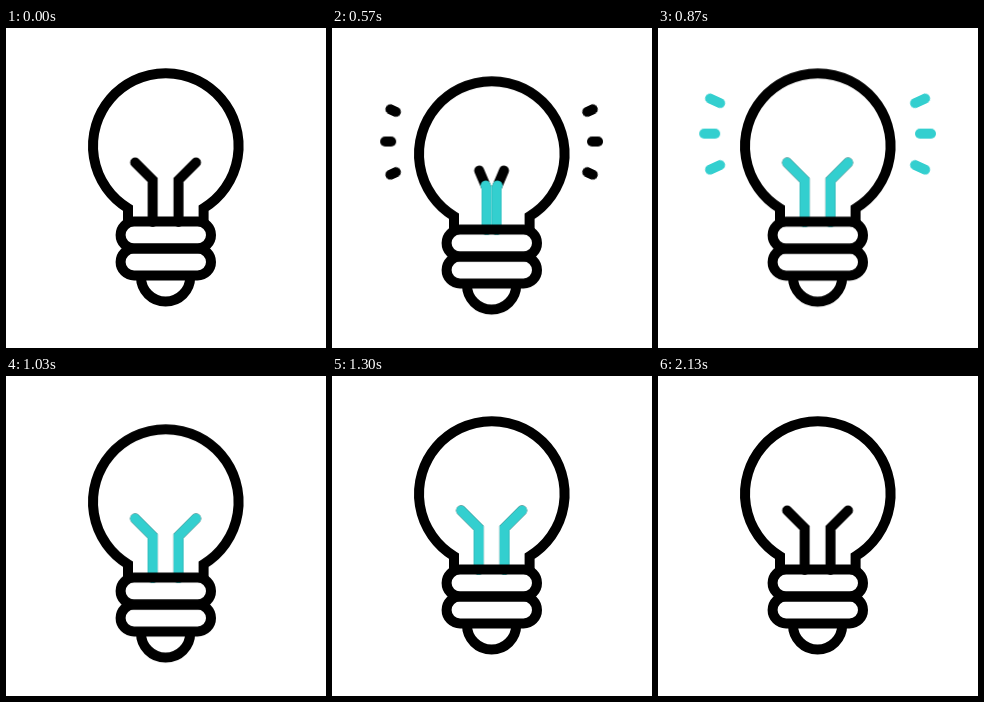
These frames come from a looping animation (320x320 px, 2.5 s). An HTML page:

```html
<!DOCTYPE html>
<html lang="en">
<head>
<meta charset="utf-8">
<title>Light bulb</title>
<style>
  html, body { margin: 0; width: 100%; height: 100%; overflow: hidden; background: #fff; }
  svg { display: block; width: 100vw; height: 100vh; }
  path, rect { fill: none; stroke: #000; stroke-width: 10; }
  .bulb, .wire, .glow, .ray { animation: 2500ms linear infinite; }

  .bulb { animation-name: bounce; }
  @keyframes bounce {
    0% { transform: translateY(0); }
    12% { transform: translateY(0); animation-timing-function: cubic-bezier(.4, 0, .8, .8); }
    26.4% { transform: translateY(12px); animation-timing-function: cubic-bezier(.33, 0, .67, 1); }
    33.2% { transform: translateY(0); }
    34% { transform: translateY(0); animation-timing-function: cubic-bezier(.4, 0, .8, .8); }
    43.6% { transform: translateY(12px); animation-timing-function: cubic-bezier(.33, 0, .67, 1); }
    52%, 100% { transform: translateY(0); }
  }

  .wire { stroke-linecap: round; animation-name: squeeze; }
  @keyframes squeeze {
    0% { d: path("M12.9 194V152L30.4 134.5"); }
    12% { d: path("M12.9 194V152L30.4 134.5"); animation-timing-function: cubic-bezier(.4, 0, .8, .8); }
    26.4% { d: path("M1 194V152L3.5 134.5"); animation-timing-function: cubic-bezier(.33, 0, .67, 1); }
    33.2%, 100% { d: path("M12.9 194V152L30.4 134.5"); }
  }

  .glow { stroke: #33cfcf; stroke-dasharray: 1 2; animation-name: squeeze, fill; }
  @keyframes fill {
    0% { stroke-dashoffset: 1; }
    12% { stroke-dashoffset: 1; animation-timing-function: cubic-bezier(.4, 0, .8, .8); }
    25.6% { stroke-dashoffset: 0; }
    69.6% { stroke-dashoffset: 0; animation-timing-function: cubic-bezier(.33, 0, .67, 1); }
    85.2%, 100% { stroke-dashoffset: 1; }
  }

  .ray { stroke-linecap: round; opacity: 0; animation-name: shoot; }
  @keyframes shoot {
    0%, 18.79% { opacity: 0; d: path("M-3 0H-2.9"); }
    18.8% { opacity: 1; d: path("M-3 0H-2.9"); }
    22.8% { opacity: 1; d: path("M-2 0H4"); }
    30%, 33% { opacity: 1; d: path("M0 0H11"); }
    33.01%, 100% { opacity: 0; d: path("M0 0H11"); }
  }
  .tint { stroke: #33cfcf; animation-name: tint; }
  @keyframes tint {
    0%, 23.99% { opacity: 0; d: path("M-2 0H-1.9"); }
    24% { opacity: 1; d: path("M-2 0H-1.9"); }
    32% { opacity: 1; d: path("M0 0H11"); }
    34.8% { opacity: 1; d: path("M0 0H11"); animation-timing-function: cubic-bezier(.33, 0, .67, 1); }
    40% { opacity: 1; d: path("M10.9 0H11"); }
    40.01%, 100% { opacity: 0; d: path("M10.9 0H11"); }
  }
</style>
</head>
<body>
<svg viewBox="0 0 320 320">
  <g class="bulb">
    <!-- right half -->
    <g transform="translate(159.6 0)">
      <path class="wire" d="M12.9 194V152L30.4 134.5"/>
      <path class="wire glow" pathLength="1" d="M12.9 194V152L30.4 134.5"/>
      <g transform="translate(97.5 75) rotate(-24.5)">
        <path class="ray" d="M0 0H11"/>
        <path class="ray tint" d="M0 0H11"/>
      </g>
      <g transform="translate(102.4 105.5)">
        <path class="ray" d="M0 0H11"/>
        <path class="ray tint" d="M0 0H11"/>
      </g>
      <g transform="translate(97.5 137) rotate(24.5)">
        <path class="ray" d="M0 0H11"/>
        <path class="ray tint" d="M0 0H11"/>
      </g>
    </g>
    <!-- left half, mirrored -->
    <g transform="translate(159.6 0) scale(-1 1)">
      <path class="wire" d="M12.9 194V152L30.4 134.5"/>
      <path class="wire glow" pathLength="1" d="M12.9 194V152L30.4 134.5"/>
      <g transform="translate(97.5 75) rotate(-24.5)">
        <path class="ray" d="M0 0H11"/>
        <path class="ray tint" d="M0 0H11"/>
      </g>
      <g transform="translate(102.4 105.5)">
        <path class="ray" d="M0 0H11"/>
        <path class="ray tint" d="M0 0H11"/>
      </g>
      <g transform="translate(97.5 137) rotate(24.5)">
        <path class="ray" d="M0 0H11"/>
        <path class="ray tint" d="M0 0H11"/>
      </g>
    </g>
    <path d="M122 193V180.2A72.8 72.8 0 1 1 197.6 180.2V193"/>
    <path d="M135 249A24.6 24.6 0 0 0 184.2 249"/>
    <rect x="114.6" y="193.5" width="90.4" height="27" rx="13.5"/>
    <rect x="114.6" y="220.5" width="90.4" height="27" rx="13.5"/>
  </g>
</svg>
</body>
</html>
```
